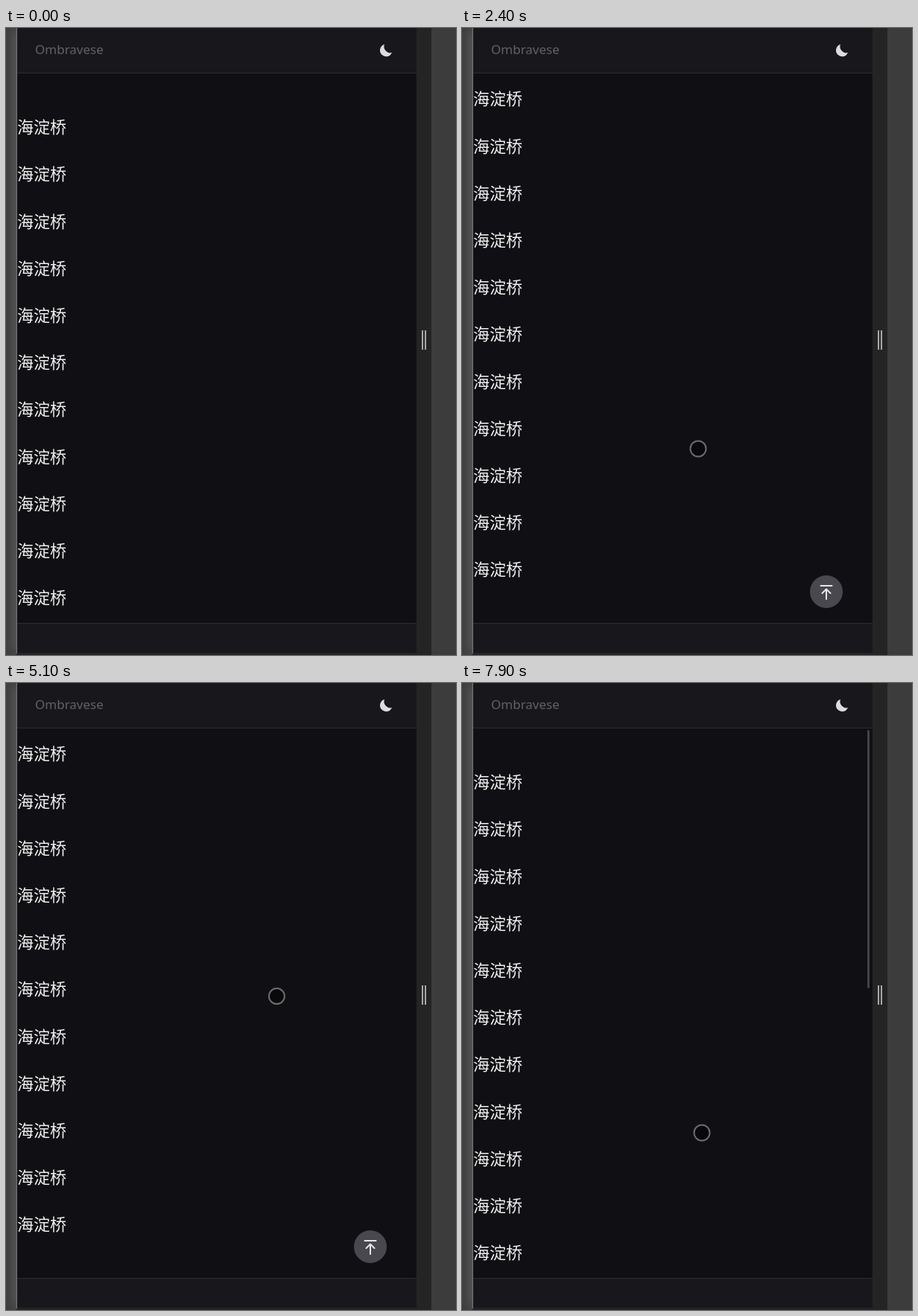
An HTML page that plays this animation: 604 px wide and 842 px high, repeating every 8000 ms.

```html
<!DOCTYPE html>
<html lang="zh-CN">
<head>
<meta charset="utf-8">
<title>Scroll list</title>
<style>
  html, body { margin: 0; width: 100%; height: 100%; overflow: hidden; background: #242424; }
  #stage { position: relative; width: 604px; height: 842px; overflow: hidden; }
  #stage div, svg { position: absolute; }
  .gutter { left: 0; top: 0; width: 14px; height: 842px; background: #3c3c3c; overflow: hidden; }
  .glow { left: 14px; top: 0; width: 536px; height: 840px; box-shadow: 0 0 20px rgba(255, 255, 255, .25); }
  .edge { left: 14px; top: 0; width: 1px; height: 840px; background: #777; }
  .panel { left: 571px; top: 0; width: 33px; height: 842px; background: #3c3c3c; }
  .grip { left: 558px; top: 406px; width: 2px; height: 26px; background: #a8a8a8; box-shadow: 4px 0 #a8a8a8; }
  .bar { left: 15px; width: 536px; background: #18181c; }
  .header { top: 0; height: 60px; border-bottom: 1px solid #2d2d30; }
  .footer { top: 799px; height: 39px; border-top: 1px solid #2d2d30; }
  .brand { left: 24px; top: 17px; font: 17px/24px "Noto Sans", sans-serif; color: #626265; }
  .view { left: 15px; top: 61px; width: 536px; height: 738px; overflow: hidden; background: #101014; }
  #list { left: 0; white-space: nowrap; color: #f0f0f0;
    font: 22px/63.2px "Noto Sans CJK SC", "Noto Sans CJK", sans-serif; }
  #list p { margin: 0; height: 63.2px; }
  #thumb { left: 544px; width: 3px; height: 347px; border-radius: 2px; background: #434347; }
  #pointer { left: -11.5px; top: -11.5px; width: 19px; height: 19px; border: 2px solid #6c6c6e;
    border-radius: 50%; background: rgba(0, 0, 0, .45); background-clip: padding-box; }
</style>
</head>
<body>
<div id="stage">
  <div class="gutter"><div class="glow"></div></div>
  <div class="view"><div id="list"></div></div>
  <div class="bar header"><div class="brand">Ombravese</div></div>
  <div class="bar footer"></div>
  <div class="edge"></div>
  <div class="panel"></div>
  <div class="grip"></div>
  <svg width="604" height="842">
    <path fill="#dcdcdd" d="M508 22A8.3 8.3 0 1 0 518 33A8.3 8.3 0 0 1 508 22Z"/>
    <g id="toTop">
      <circle cx="489" cy="757" r="22" fill="#48484e"/>
      <path d="M481.5 749H496.5M489 767V753.5M483.5 759L489 753.5L494.5 759" fill="none"
        stroke="#e6e6e7" stroke-width="2" stroke-linecap="round" stroke-linejoin="round"/>
    </g>
  </svg>
  <div id="thumb"></div>
  <div id="pointer"></div>
</div>
<script>
  const LOOP = 8000, STEP = 100, ROWS = 23, END = 796;
  const POINTER_SHOWN = 300, THUMB_SHOWN = 6300;
  const $ = id => document.getElementById(id);
  const list = $('list'), toTop = $('toTop'), thumb = $('thumb'), pointer = $('pointer');
  list.innerHTML = '<p>海淀桥</p>'.repeat(ROWS);

  const flicks = [
    { from: 1111, to: 2400, scroll: END },
    { from: 2992, to: 4000, scroll: 0 },
    { from: 4300, to: 4700, scroll: END },
    { from: 7000, to: 7900, scroll: 0 }
  ];
  const entry = { x: 258.5, y: 111.5 };
  const moves = [
    { from: 300, to: 700, x: 301.5, y: 506.5 },
    { from: 1100, to: 1400, x: 303.5, y: 436.5 },
    { from: 1500, to: 2400, x: 316.5, y: 564.5 },
    { from: 2600, to: 3400, x: 308.5, y: 537.5 },
    { from: 3400, to: 4200, x: 301.5, y: 619.5 },
    { from: 4300, to: 4700, x: 321.5, y: 422.5 },
    { from: 5000, to: 5500, x: 528.5, y: 410.5 },
    { from: 5600, to: 6300, x: 537.5, y: 416.5 },
    { from: 6600, to: 6900, x: 375.5, y: 424.5 },
    { from: 7000, to: 7900, x: 321.5, y: 603.5 }
  ];

  const clamp = k => Math.min(1, Math.max(0, k));
  const mix = (a, b, k) => a + (b - a) * k;
  const smooth = k => k * k * k * (k * (6 * k - 15) + 10);
  const progress = (time, { from, to }) => clamp((time - from) / (to - from));

  const scrollAt = time => Math.round(
    flicks.reduce((pos, flick) => mix(pos, flick.scroll, smooth(progress(time, flick))), 0));

  const pointerAt = time => moves.reduce((pos, move) => {
    const k = progress(time, move);
    return { x: mix(pos.x, move.x, k), y: mix(pos.y, move.y, k) };
  }, entry);

  const show = (element, visible) => element.style.visibility = visible ? 'visible' : 'hidden';

  function draw(now) {
    const time = Math.floor((now % LOOP) / STEP) * STEP;
    const scroll = scrollAt(time), { x, y } = pointerAt(time);
    list.style.top = 39.2 - scroll + 'px';
    toTop.style.opacity = clamp((scroll - 150) / 200);
    thumb.style.top = Math.round(mix(63, 450, scroll / END)) + 'px';
    pointer.style.transform = `translate(${x}px, ${y}px)`;
    show(thumb, time >= THUMB_SHOWN);
    show(pointer, time >= POINTER_SHOWN);
  }

  const start = performance.now();
  function tick() {
    draw(performance.now() - start);
    requestAnimationFrame(tick);
  }
  tick();
</script>
</body>
</html>
```
